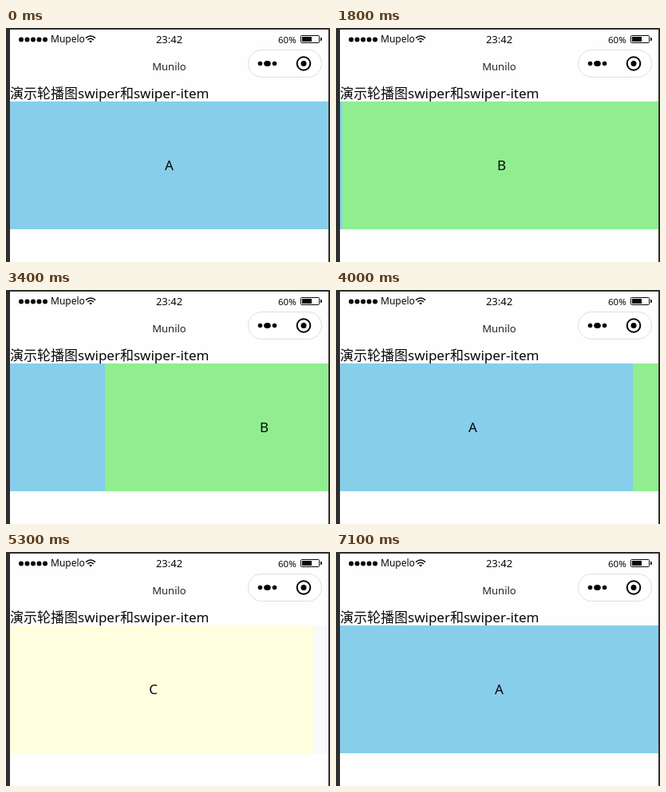
These frames come from a looping animation (406 px wide and 293 px high, 7700 ms). An HTML page:

```html
<!DOCTYPE html>
<html lang="zh">
<head>
<meta charset="utf-8">
<title>Swiper</title>
<style>
  html, body { margin: 0; width: 100%; height: 100%; overflow: hidden; background: #2e2e2e; }
  svg { display: block; width: 406px; height: 293px; }
  text { font-family: "Noto Sans", "Noto Sans CJK SC", "Noto Sans CJK", sans-serif; font-size: 17px; fill: #080808; }
  .mid { text-anchor: middle; }
</style>
</head>
<body>
<svg viewBox="0 0 406 293">
  <defs><clipPath id="view"><rect x="5" y="92" width="399" height="160"/></clipPath></defs>
  <rect x="5" y="2" width="399" height="291" fill="#fefefe"/>

  <!-- status bar -->
  <g id="signal"></g>
  <text x="56" y="18.4" style="font-size:12px">Mupelo</text>
  <g fill="none" stroke="#080808" stroke-width="1.5">
    <path d="M100 12.6Q106 7.4 112 12.6M102.2 14.9Q106 11.7 109.8 14.9"/>
    <path d="M104 16.4Q106 14.9 108 16.4L106 18.6Z" fill="#080808" stroke="none"/>
  </g>
  <text class="mid" x="204.5" y="19" style="font-size:13px">23:42</text>
  <text x="341" y="18.6" style="font-size:11.5px">60%</text>
  <rect x="369.5" y="9.5" width="23" height="9" rx="1" fill="none" stroke="#080808"/>
  <rect x="371" y="11" width="12" height="6" fill="#080808"/>
  <path d="M394 11.5q2 .5 2 2.5t-2 2.5z" fill="#080808"/>

  <!-- navigation bar -->
  <text class="mid" x="204.5" y="53" style="font-size:13px;fill:#222">Munilo</text>
  <rect x="303.5" y="27.5" width="92" height="34" rx="17" fill="#fff" stroke="#dedede"/>
  <circle cx="318.5" cy="44.5" r="2.8"/>
  <ellipse cx="327.5" cy="44.5" rx="4.3" ry="3.6"/>
  <circle cx="336.5" cy="44.5" r="2.8"/>
  <circle cx="373" cy="44.5" r="8.3" fill="none" stroke="#000" stroke-width="2"/>
  <circle cx="373" cy="44.5" r="3.5"/>

  <text x="5" y="88">演示轮播图swiper和swiper-item</text>

  <g clip-path="url(#view)">
    <rect x="5" y="92" width="399" height="160" fill="#f8f9fb"/>
    <g id="track"></g>
  </g>
</svg>
<script>
const LOOP = 7700, STEP = 100, PAGE = 400;
const drag = u => u;
const settle = u => 1 - (1 - u) ** 2;

// [time, track offset, easing used to get there]
const keys = [
  [1180, 0], [1350, -110, drag], [1850, -400, settle],
  [1960, -267, drag], [2430, -400, settle],
  [2880, -400, drag], [3400, -281, drag], [3480, -250, drag], [3960, 0, settle],
  [4080, -100, drag], [4530, -400, settle],
  [4630, -490, drag], [5110, -800, settle],
  [5300, -820, drag], [5400, -800, settle],
  [5500, -700, drag], [5960, -400, settle],
  [6050, -305, drag], [6550, 0, settle],
  [6610, 58, drag], [7100, 0, settle]
];

function offsetAt(t) {
  const i = keys.findIndex(k => k[0] > t);
  if (i < 1) return 0;
  const [t0, x0] = keys[i - 1], [t1, x1, ease] = keys[i];
  return x0 + (x1 - x0) * ease((t - t0) / (t1 - t0));
}

const track = document.getElementById("track");
track.innerHTML = [["A", "#87ceeb"], ["B", "#90ee90"], ["C", "#ffffe0"]].map(([name, color], i) =>
  `<rect x="${5 + i * PAGE}" y="92" width="${PAGE}" height="160" fill="${color}"/>
   <text class="mid" x="${204.5 + i * PAGE}" y="178">${name}</text>`).join("");

document.getElementById("signal").innerHTML = [0, 1, 2, 3, 4].map(i =>
  `<circle cx="${19 + i * 7.5}" cy="14.5" r="3" fill="#080808"/>`).join("");

const start = performance.now();
function draw() {
  const t = (performance.now() - start) % LOOP;
  const x = Math.round(offsetAt(Math.floor(t / STEP) * STEP));
  track.setAttribute("transform", `translate(${x} 0)`);
  requestAnimationFrame(draw);
}
draw();
</script>
</body>
</html>
```
